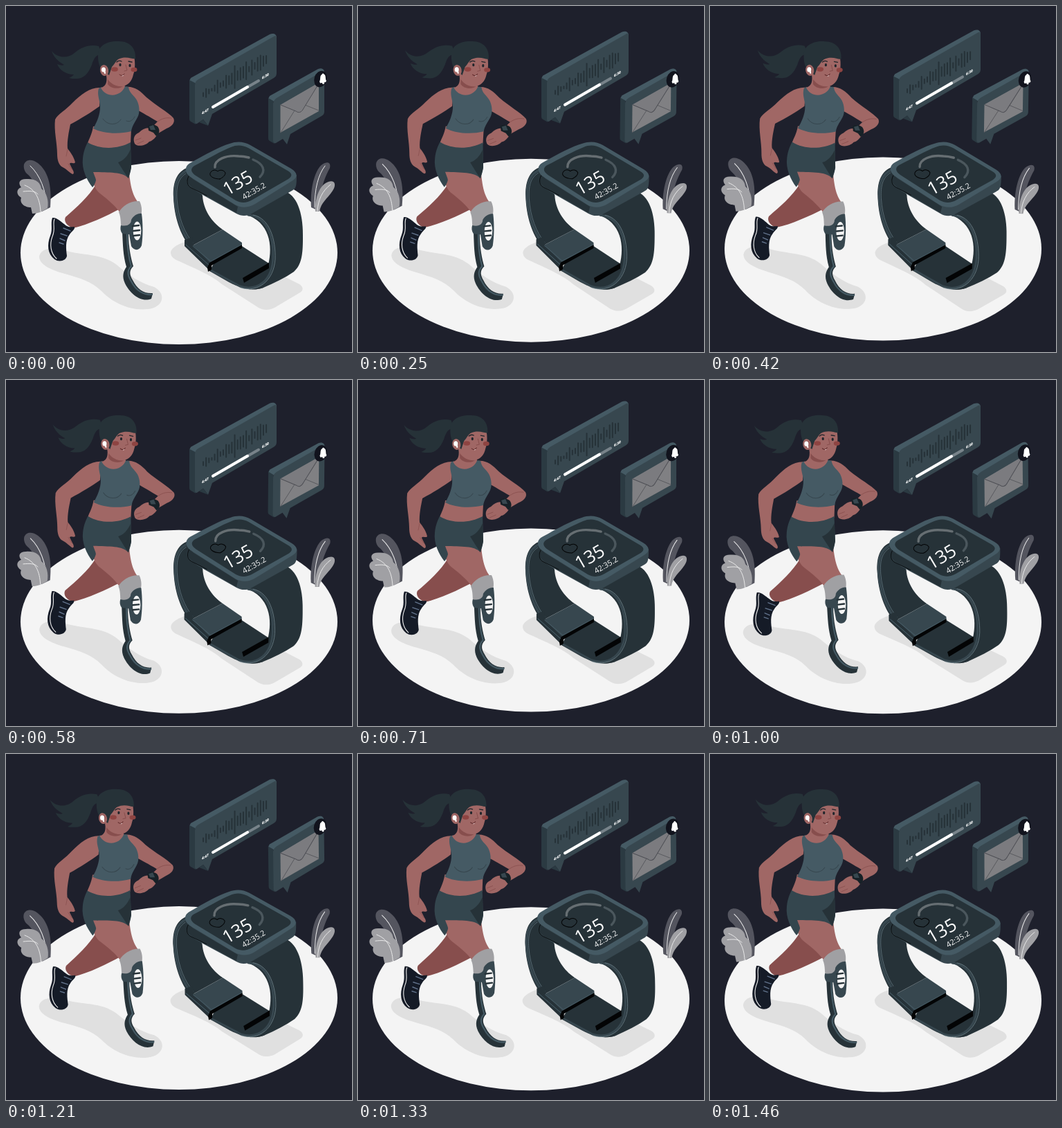
Write an HTML page with a canvas that moves like this. It is 500x500 px and loops after 1.5 s.

```html
<!DOCTYPE html>
<html lang="en">
<head>
<meta charset="utf-8">
<title>Runner and smartwatch</title>
<style>
html, body { margin: 0; width: 100%; height: 100%; overflow: hidden; background: #1e202c; }
canvas { display: block; width: 500px; height: 500px; }
</style>
</head>
<body>
<canvas id="stage"></canvas>
<script>
const SIZE = 500, LOOP = 1500, STEP = 1000 / 24;
const NIGHT = '#1e202c', INK = '#263238', SLATE = '#37474f', TEAL = '#455a64', LIGHT = '#f4f4f4';
const SKIN = '#a06765', SKIN_DARK = '#874e4d', BLACK = '#030405';
const FONT = '"Open Sans", "Noto Sans", sans-serif';

const canvas = document.getElementById('stage');
const ctx = canvas.getContext('2d');
const ratio = window.devicePixelRatio || 1;
canvas.width = canvas.height = SIZE * ratio;

function fill(color, d) {
  ctx.fillStyle = color;
  ctx.fill(new Path2D(d));
}

function line(color, width, d) {
  ctx.strokeStyle = color;
  ctx.lineWidth = width;
  ctx.lineCap = ctx.lineJoin = 'round';
  ctx.stroke(new Path2D(d));
}

function oval(color, x, y, rx, ry, tilt = 0) {
  ctx.fillStyle = color;
  ctx.beginPath();
  ctx.ellipse(x, y, rx, ry, tilt, 0, Math.PI * 2);
  ctx.fill();
}

// The baseline climbs at 30 degrees; (c, d) is the direction down a glyph.
function label(text, x, y, font, c, d) {
  ctx.save();
  ctx.transform(0.866, -0.5, c, d, x, y);
  ctx.font = font + ' ' + FONT;
  ctx.fillStyle = '#fff';
  ctx.fillText(text, 0, 0);
  ctx.restore();
}

function turned(x, y, degrees, draw) {
  ctx.save();
  ctx.translate(x, y);
  ctx.rotate(degrees * Math.PI / 180);
  ctx.translate(-x, -y);
  draw();
  ctx.restore();
}

function shadows() {
  fill('#e0e0e0', 'M48 362C50 350 66 348 84 353C110 361 138 357 160 374C176 388 194 401 214 406C233 416 227 436 205 438C180 441 154 429 138 412C124 398 106 393 85 387C63 381 48 373 48 362Z');
  fill('#e0e0e0', 'M238 356C240 347 254 342 265 339L320 350L424 402C430 406 430 411 425 414L388 436C380 440 372 440 365 436L312 402C296 388 270 378 246 367C240 364 238 360 238 356Z');
}

function plants() {
  fill('#54555f', 'M26 229C29 221 38 221 46 227C60 238 67 258 64 291L52 297C50 275 42 252 31 243C27 240 25 234 26 229Z');
  line('#e9e9ea', 1, 'M35 231C49 244 58 266 59 292');
  fill('#a0a0a4', 'M38 300L36 291C27 291 19 285 22 277C15 273 14 265 22 262C17 256 19 250 29 250C43 249 50 255 51 264C59 269 62 282 60 292C53 297 46 300 38 300Z');
  line('#f0f0f0', 0.9, 'M27 259C43 265 49 279 50 297M25 268C35 267 42 267 46 272');
  fill('#54555f', 'M441 291C439 260 448 235 457 229C464 224 470 226 468 234C461 247 454 263 452 296Z');
  line('#e9e9ea', 1, 'M461 231C451 244 446 264 446 291');
  fill('#a0a0a4', 'M447 297C446 278 453 258 466 254C475 251 478 258 472 267C464 279 455 284 453 297Z');
  line('#f0f0f0', 0.9, 'M469 258C457 267 451 280 450 296');
}

function legs() {
  fill(SKIN_DARK, 'M130 258C119 276 102 291 86 305C83 311 88 318 97 321C119 316 146 303 165 293L145 262Z');
  fill('#151b27', 'M67 306C73 305 80 312 84 315C90 321 96 319 99 319C100 323 95 325 92 330C85 339 87 352 88 361C87 368 77 371 70 366C60 358 59 345 64 332C68 322 64 315 67 306Z');
  line('#f0f0f0', 1.1, 'M70 308C67 315 72 322 67 333C63 344 64 357 73 365');
  line('#62738c', 1.4, 'M83 321L93 325M79 329L88 332M78 336L85 339M77 342L83 344');
  fill(SKIN, 'M126 228C122 250 127 264 136 271C149 281 159 290 165 299L192 285C182 273 179 258 177 228Z');

  fill(INK, 'M168 326L177 328C177 350 181 366 184 376C177 383 179 389 183 396C190 410 200 416 212 415L210 423C196 429 180 417 172 401C167 390 170 383 174 377C169 360 169 345 168 326Z');
  line(TEAL, 2.2, 'M175 328C175 350 178 366 181 376C174 383 176 390 181 398C188 412 200 418 211 417');
  fill('#a0a0a3', 'M163 298C168 289 180 281 193 282C197 290 197 299 194 306L181 316L167 321C165 316 167 307 163 298Z');
  fill(SLATE, 'M166 317C176 319 181 315 181 309C184 303 191 299 196 300C198 315 198 332 196 346C193 354 185 354 181 347L178 330L168 329C165 325 165 321 166 317Z');
  oval('#f4f4f4', 189.5, 325, 5.8, 13.5);
  line(INK, 2.4, 'M183 318L192 317M184 325L193 324M184 332L193 331');
}

function leftArm() {
  fill(SKIN, 'M137 118C122 117 109 127 96 140C87 150 75 156 71 164C69 180 74 198 74 214C74 222 76 230 82 233C88 236 92 241 96 243C99 243 98 239 96 236L92 228C94 225 98 229 100 226C98 217 92 210 89 206C88 195 91 181 93 171C108 163 124 153 135 145Z');
  line(SKIN_DARK, 0.7, 'M89 207L87 217M95 236L90 228');
}

function rightArm() {
  fill(SKIN, 'M172 117C184 115 194 122 203 132C217 144 234 153 242 162C245 168 240 174 232 177L220 184C216 190 212 195 207 196C202 202 190 204 186 199C183 192 185 186 192 183C198 177 204 175 209 177L219 167C207 160 197 154 189 150Z');
  line(SKIN_DARK, 0.8, 'M219 167C226 162 232 161 239 162M187 194L195 191M190 199L199 195');
  fill('#172127', 'M205 173C209 170 215 171 219 174C223 179 222 185 217 188L213 183L206 180Z');
  fill(SLATE, 'M207 174L213 172L216 179L209 179Z');
}

function body() {
  fill(SKIN, 'M126 174C124 186 120 192 118 198C138 210 165 208 180 199L181 177Z');
  fill(TEAL, 'M134 119L138 117C144 131 164 131 171 116L177 117C178 126 185 129 189 136C193 144 194 154 190 161C185 170 182 174 181 181C162 186 139 184 126 177C132 167 136 156 136 146C136 136 131 129 134 119Z');
  fill(SKIN, 'M145 100C147 113 142 117 137 118C144 133 166 132 172 116L168 110Z');
  fill(SKIN_DARK, 'M147 106C153 114 161 117 169 116C162 121 151 119 147 113Z');
  line(SLATE, 1, 'M140 163C147 173 160 173 166 164M186 160C183 166 178 168 174 166');
  fill('#34464e', 'M118 197C136 208 162 207 180 197L181 233C180 241 178 245 177 249C168 239 150 241 126 240C128 246 130 249 130 252C129 256 127 260 125 262C117 252 109 236 111 220C112 210 115 203 118 197Z');
  fill(INK, 'M180 207C176 217 169 224 162 226C167 234 172 242 177 249L181 233Z');
}

function head() {
  fill(INK, 'M66 65C74 75 89 77 100 67C110 59 121 55 134 58L140 74C132 66 127 75 124 85C119 98 112 105 102 105C97 105 94 105 91 104C95 102 97 101 98 99C86 99 77 92 74 84C79 86 82 86 84 85C75 80 69 74 66 65Z');
  fill(SKIN, 'M147 82C151 68 172 64 184 69C187 78 187 91 184 99C182 109 176 115 168 116C158 116 148 110 145 100Z');
  fill(INK, 'M133 72C132 57 147 50 163 51C180 51 188 62 187 76C183 78 175 71 162 77C158 80 157 84 153 88L149 100C145 96 140 97 138 91C134 86 133 79 133 72Z');
  oval(SKIN, 142, 93, 6, 8, -0.2);
  line(SKIN_DARK, 0.8, 'M138 91C139 86 145 87 145 92');
  oval('#fff', 141, 92, 3, 3.6);
  line('#fff', 2, 'M142 92L143 97');
  oval('#8e4442', 157, 91.5, 4.8, 3.2);
  oval('#8e4442', 185, 92, 4.5, 3.2);
  oval('#20252b', 165, 85, 1.6, 2.2);
  oval('#20252b', 179, 86, 1.6, 2.2);
  line('#20252b', 1.3, 'M160 81C162 79 165 79 167 80M177 80L182 81');
  line(SKIN_DARK, 1, 'M173 85L175 93L171 94');
  line('#5b2728', 1, 'M164 99C166 101 169 101 171 98');
  line('#f2dddd', 0.8, 'M168 101L169.5 100.5');
}

function runner() {
  legs();
  rightArm();
  leftArm();
  body();
  head();
}

function strap() {
  fill(INK, 'M264 233C245 239 241 258 242 276C243 305 252 331 266 348L313 323C297 312 285 294 284 274Z');
  line(SLATE, 3.5, 'M261 238C246 245 243 260 244 278C246 305 254 326 265 341');
  line('#60747d', 0.8, 'M262 241C248 248 246 262 247 279C249 306 258 328 270 342');
  // Far floor of the loop, then the broad outer face with its lit rim.
  fill(INK, 'M294 383L314 348L341 347L380 372L372 407C355 413 339 408 322 399Z');
  fill(INK, 'M346 301L404 268C423 276 430 305 429 336C429 360 427 374 416 384C403 393 388 400 372 407C358 412 346 408 340 404L379 374C386 346 381 312 346 301Z');
  line(SLATE, 3, 'M350 302C378 305 387 335 386 363C385 397 363 413 338 405L296 382');
  line('#70848c', 0.8, 'M357 302C381 306 390 338 389 366C387 397 364 415 339 407');

  fill(SLATE, 'M313 323L341 342L341 349L294 375L268 354L270 346Z');
  fill(INK, 'M258 338L269 334L271 347L296 372L296 384L258 347Z');
  line(TEAL, 1, 'M260 345L293 374M270 347L296 369L340 345');
  fill(BLACK, 'M294 371L341 345L341 350L297 375L297 381L292 384L291 378Z');
  fill(BLACK, 'M342 393L380 371L380 379L344 400Z');
}

function watchCase() {
  fill(SLATE, 'M260 237L261 252C261 259 270 264 277 269L333 300C340 304 348 304 355 300L413 267C419 264 420 261 420 244Z');
  fill(INK, 'M260 239L261 252C263 260 272 265 280 269L333 299L335 290L270 250Z');
  line(BLACK, 0.8, 'M264 246C260 253 262 260 268 263L290 274');
  fill(TEAL, 'M266 227C289 214 309 203 323 199C334 195 344 196 353 201L412 235C422 241 422 248 413 253L360 286C350 292 340 292 331 287L268 248C258 242 257 232 266 227Z');
  fill(INK, 'M272 231C291 221 312 209 325 204C334 200 342 201 350 205L407 238C414 242 414 246 408 250L356 280C347 285 340 285 332 281L274 245C267 240 266 235 272 231Z');
  line('#666e72', 3.4, 'M302 233C301 222 318 215 336 217C342 217 347 218 351 219');
  line('#4b575d', 3.4, 'M357 222C372 228 376 238 367 247');
  line(BLACK, 1, 'M309 250C299 250 292 245 296 240C299 236 304 237 306 239C309 236 315 237 317 241C317 245 313 248 309 250Z');
  label('135', 320, 274.5, '500 26px', 0.5, 0.866);
  label('42:35.2', 344, 280, '500 11px', 0.5, 0.866);
}

function watch() {
  strap();
  watchCase();
}

function musicPanel() {
  fill(TEAL, 'M267 104L381 41C386 39 391 40 391 46L273 112L265 108Z');
  fill('#2b3a42', 'M265 107L273 111L274 171L267 167C265 166 265 164 265 162Z');
  fill(SLATE, 'M273 114C273 110 275 108 278 106L387 44C390 42 391 44 391 47L391 97C391 100 390 102 387 104L298 156L292 173L285 164L276 170C274 171 273 169 273 167Z');
  fill('#2b3a42', 'M279 168L285 164L292 173Z');
  const heights = [7, 14, 8, 5, 10, 20, 8, 9, 20, 14, 17, 34, 15, 19, 18, 27, 9, 23, 11, 21, 23, 16, 13];
  heights.forEach((h, i) => {
    const x = 285 + i * 4.14, y = 128 - i * 2.3;
    line(INK, 2, `M${x} ${y - h / 2 + 1}V${y + h / 2 - 1}`);
  });
  line('#78838a', 4, 'M299 146L365 108');
  line('#fff', 4, 'M299 146L349 117');
  label('4:47', 283, 157, '800 5.5px', 0, 1);
  label('6:30', 370, 106, '800 5.5px', 0, 1);
}

function mailPanel() {
  fill(TEAL, 'M381 130L451 91C456 89 460 91 460 96L387 138L379 134Z');
  fill('#2b3a42', 'M379 133L386 137L388 199L381 195C379 194 379 192 379 190Z');
  fill(SLATE, 'M386 141C386 138 388 135 391 133L456 95C459 94 460 95 460 98L460 153C460 156 458 158 456 159L411 185L406 200L400 192L390 198C388 199 386 197 386 194Z');
  fill('#808083', 'M396.5 143L452 111L452 152L396.5 183Z');
  line('#55565b', 0.9, 'M397 183L417 151M452 151L432 143');
  fill('#7b7b7f', 'M396.5 143L452 111L430 148C427 154 423 155 419 152Z');
  line('#4e4f55', 1, 'M397 143L419 152C423 155 427 154 430 148L452 112');
  oval('#11131d', 454.5, 105.5, 9, 12, 0.3);
  fill('#fff', 'M453 109C455 107 453 100 456.5 99C457 97 459 97 459.5 98.5C463 100 461 106 463 108L462 110L454 111.5Z');
  oval('#fff', 458.5, 111.5, 1.6, 1.4);
}

function draw(ms) {
  const t = Math.floor((ms % LOOP + 2) / STEP) * STEP / LOOP;
  const lift = -10 * (1 - Math.abs(1 - 2 * t));
  // Linear swing: 0 to 1 at a quarter, -1 at three quarters, back to 0.
  const sway = t < 0.25 ? 4 * t : t < 0.75 ? 2 - 4 * t : 4 * t - 4;

  ctx.setTransform(ratio, 0, 0, ratio, 0, 0);
  ctx.fillStyle = NIGHT;
  ctx.fillRect(0, 0, SIZE, SIZE);
  oval(LIGHT, 250, 356.5 + lift, 229, 132.5);
  turned(238, 390, sway, shadows);
  turned(247, 261, sway, plants);
  turned(155, 238, sway, runner);
  turned(335, 303, sway, watch);
  ctx.save();
  ctx.translate(0, lift);
  musicPanel();
  ctx.restore();
  turned(422, 145, sway, mailPanel);
}

const start = performance.now();
function tick() {
  draw(performance.now() - start);
  requestAnimationFrame(tick);
}
tick();
</script>
</body>
</html>
```
